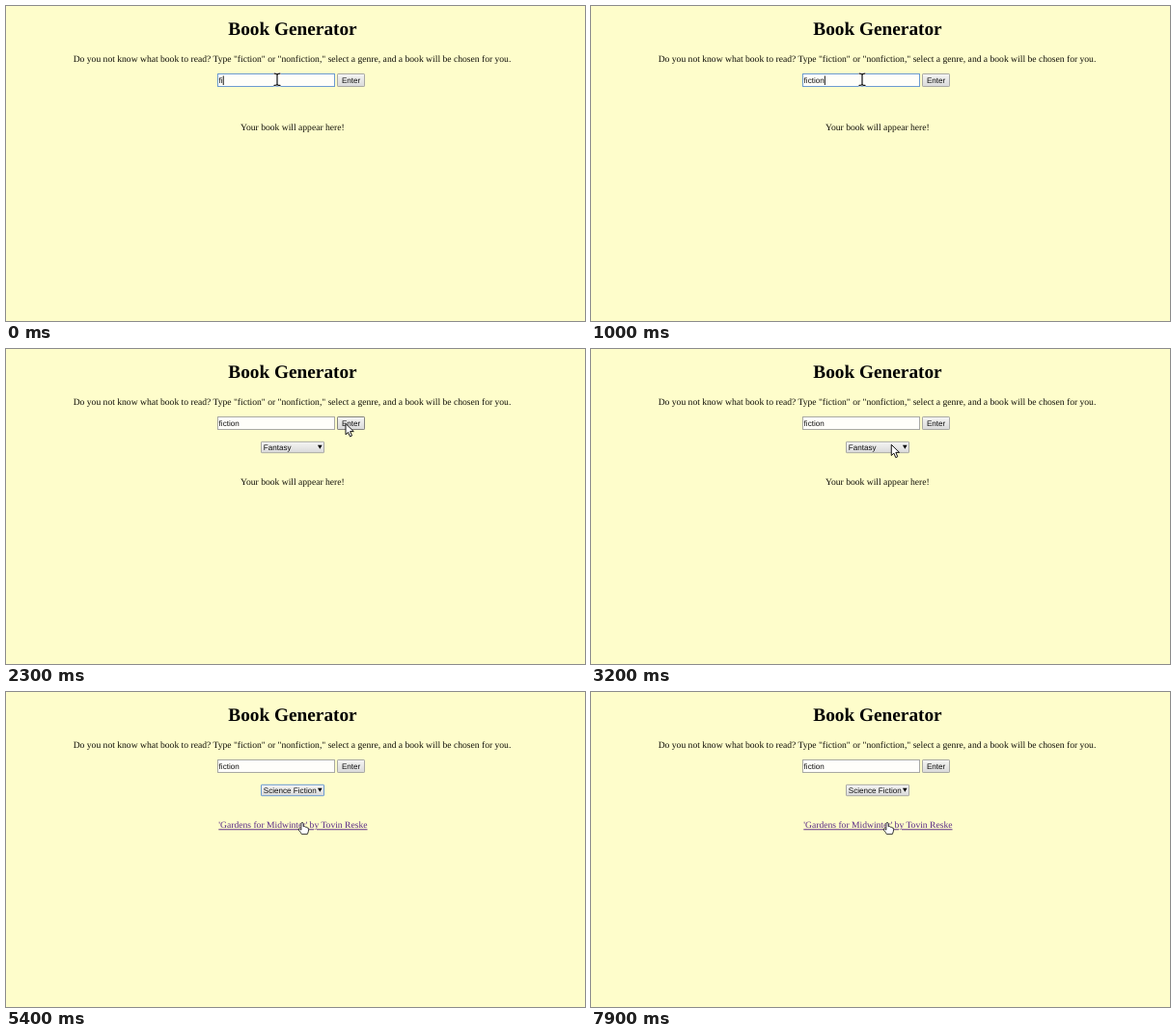
Recreate the animation shown at these times as an HTML page. Size 600 by 327 pixels, loop 8000 ms.

```html
<!DOCTYPE html>
<html lang="en">
<head>
<meta charset="utf-8">
<title>Book Generator</title>
<style>
  html, body { margin: 0; width: 100%; height: 100%; overflow: hidden; background: #fefdcb; }
  svg { display: block; width: 600px; height: 327px; text-rendering: geometricPrecision; }
  .serif { font: 9.6px "Liberation Serif", "Times New Roman", serif; fill: #111008; }
  .sans { font: 8.1px "Liberation Sans", Arial, sans-serif; fill: #111; }
  h1, .title { font-size: 19.3px; font-weight: bold; fill: #000; }
  .box { stroke: #a9a9a4; stroke-width: 1; }
  .box.focus { stroke: #6c9bd0; }
  .box.hover { stroke: #85857f; }
  .link { text-decoration: underline; fill: #2020d8; }
  .link.visited { fill: #5a2a86; }
</style>
</head>
<body>
<svg viewBox="0 0 600 327">
  <defs>
    <linearGradient id="face" x2="0" y2="1">
      <stop offset="0" stop-color="#f5f5f3"/>
      <stop offset="1" stop-color="#dadada"/>
    </linearGradient>
  </defs>

  <text class="serif title" x="297" y="30" text-anchor="middle">Book Generator</text>
  <text class="serif" x="69.7" y="57.7">Do you not know what book to read? Type "fiction" or "nonfiction," select a genre, and a book will be chosen for you.</text>

  <rect id="field" class="box" x="219.5" y="70.5" width="121" height="13" fill="#fffefa"/>
  <text id="typed" class="sans" x="220.6" y="80"></text>
  <path id="caret" d="M0 72.5V82" stroke="#000" stroke-width=".9"/>

  <rect id="button" class="box" x="343.5" y="70.5" width="28" height="13" rx=".6" fill="url(#face)"/>
  <text class="sans" x="357.6" y="80" text-anchor="middle">Enter</text>

  <g id="select">
    <rect id="menu" class="box" x="264.5" y="96.3" width="65" height="11.4" rx=".6" fill="url(#face)"/>
    <text id="genre" class="sans" x="266.8" y="105"></text>
    <path d="M323 99.8h4.6l-2.3 4z" fill="#000"/>
  </g>

  <text id="result" class="serif"></text>

  <g id="ibeam" fill="none" stroke-linecap="round">
    <path d="M-3-6Q0-6 0-4.5Q0-6 3-6M0-5V5M-3 6.2Q0 6.2 0 4.7Q0 6.2 3 6.2" stroke="#fff" stroke-width="2.2"/>
    <path d="M-3-6Q0-6 0-4.5Q0-6 3-6M0-5V5M-3 6.2Q0 6.2 0 4.7Q0 6.2 3 6.2" stroke="#111" stroke-width="1.2"/>
  </g>
  <path id="arrow" d="M0 0V11.3L2.6 8.9L4.5 13.4L6.5 12.5L4.6 8.1H8.3Z" fill="#fff" stroke="#111" stroke-width="1"/>
  <path id="hand" d="M-1.1 1Q0-.6 1.1 1V4.5Q2.4 3.8 3.1 5Q4.4 4.5 5 5.7Q6.6 5.4 6.6 7.2Q6.7 9.6 5.3 12.4H-.6Q-1.5 10.4-3.8 7.9Q-4.2 6.4-2.8 6.6L-1.1 8Z" fill="#fff" stroke="#222" stroke-width=".9" stroke-linejoin="round"/>
</svg>

<script>
const LOOP = 8000, STEP = 100;
const $ = id => document.getElementById(id);

// Each list holds [start time, value]; a value lasts until the next entry.
const typing = [[0, "fi"], [100, "fic"], [400, "fict"], [700, "fictio"], [800, "fiction"]];
const focus = [[0, "field"], [2200, "button"], [3300, "menu"], [6300, ""]];
const genres = [[0, ""], [2200, "Fantasy"], [4800, "Science Fiction"]];
const results = [
  [0, { text: "Your book will appear here!", x: 243, y: 129.2, cls: "" }],
  [2200, { text: "Your book will appear here!", x: 243, y: 141.3, cls: "" }],
  [3500, { text: "'A Candle in the Orchard' by Lira Velim", x: 220.3, y: 141.3, cls: "link" }],
  [4800, { text: "'Gardens for Midwinter' by Tovin Reske", x: 220.3, y: 141.3, cls: "link visited" }],
];
// Pointer path: [time, x, y], straight between entries.
const path = [
  [0, 281, 76.2], [1400, 281, 76.2], [2100, 352, 77.5], [2700, 352, 77.5],
  [3300, 308, 101], [3700, 308, 101], [4000, 316, 107.8],
  [5399, 316, 107.8], [5400, 307, 135.2], [LOOP, 307, 135.2],
];

const at = (list, t) => list.filter(([start]) => start <= t).pop()[1];

function pointer(t) {
  const i = path.findIndex(([time]) => time > t);
  const [t0, x0, y0] = path[i - 1], [t1, x1, y1] = path[i];
  const k = (t - t0) / (t1 - t0);
  const p = k * k * (3 - 2 * k);
  return [x0 + (x1 - x0) * p, y0 + (y1 - y0) * p];
}

const show = (el, on) => el.setAttribute("visibility", on ? "visible" : "hidden");

function setText(el, text) {
  if (el.textContent !== text) el.textContent = text;
}

function render(time) {
  const t = Math.floor((time % LOOP) / STEP) * STEP;
  const focused = at(focus, t), genre = at(genres, t), result = at(results, t);
  const [x, y] = pointer(t);

  setText($("typed"), at(typing, t));
  $("caret").setAttribute("transform", `translate(${221.2 + $("typed").getComputedTextLength()})`);
  show($("caret"), focused === "field");

  const overButton = x > 343 && y < 84;
  $("field").classList.toggle("focus", focused === "field");
  $("menu").classList.toggle("focus", focused === "menu");
  $("button").classList.toggle("hover", overButton);

  setText($("genre"), genre);
  show($("select"), genre !== "");

  const line = $("result");
  setText(line, result.text);
  line.setAttribute("class", "serif " + result.cls);
  line.setAttribute("x", result.x);
  line.setAttribute("y", result.y);

  const shape = x < 341 && y < 84 ? "ibeam" : y > 130 ? "hand" : "arrow";
  for (const id of ["ibeam", "arrow", "hand"]) show($(id), id === shape);
  $(shape).setAttribute("transform", `translate(${x} ${y})`);
}

const begin = performance.now();
function tick() {
  render(performance.now() - begin);
  requestAnimationFrame(tick);
}
tick();
</script>
</body>
</html>
```
